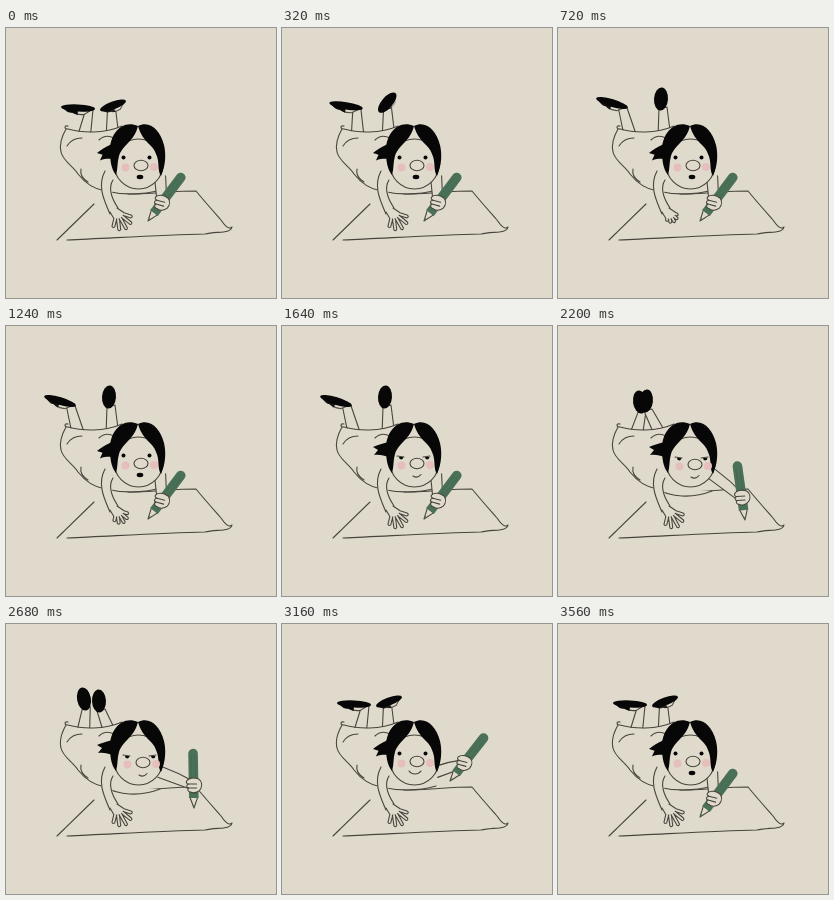
These frames come from a looping animation (270 px wide and 270 px high, 3640 ms). An HTML page:

```html
<!DOCTYPE html>
<html lang="en">
<head>
<meta charset="utf-8">
<title>Girl drawing</title>
<style>
html, body { margin: 0; width: 100%; height: 100%; overflow: hidden; background: #dfdacc; }
svg { display: block; width: 100vw; height: 100vh; }
.ln { fill: none; stroke: #48453d; stroke-width: 1.1; stroke-linecap: round; stroke-linejoin: round; }
.sk { fill: #dfdacc; }
.bk { fill: #070707; }
.blush { fill: #e6bfbd; }
</style>
</head>
<body>
<svg viewBox="0 0 270 270">
  <g id="legs"></g>

  <!-- skirt -->
  <path class="sk" d="M60 101C76 106 98 106 116 98L130 120L112 163H99C80 158 54 135 54 119Z"/>
  <path class="ln" d="M116 98C98 106 76 105 62 101C58 101 58 97 62 98M60 101C56 108 53 116 55 124C57 133 67 138 72 146C79 155 88 161 99 163"/>
  <path class="ln" d="M61 118C64 113 69 110 76 110M93 112C97 108 102 107 108 110M75 141C74 146 77 151 82 154"/>

  <!-- paper -->
  <path class="ln" d="M51 212L88 176M122 166C145 166 168 163 190 163C199 174 208 184 215 192C219 198 223 202 226 199C225 206 210 203 199 206C155 207 108 210 61 212"/>
  <path class="ln sk" id="chest"/>

  <!-- resting arm -->
  <path class="sk" d="M99 143C91 158 97 172 104 187L112 181C106 172 104 160 109 150Z"/>
  <path class="ln" d="M99 143C91 158 98 172 104 186M107 152C102 160 106 171 112 180"/>
  <path class="ln sk" id="palm"/>

  <path class="ln sk" id="arm"/>
  <path class="bk" id="tail" d="M107 116C101 117 96 119 91 121L96 124L92 129C98 128 102 130 107 131Z"/>

  <!-- head -->
  <ellipse class="ln sk" cx="132.500" cy="136" rx="24.500" ry="25"/>
  <path class="bk" d="M132 98C116 91 104 106 104 122C104 132 105 141 110 147C112 141 111 134 113 128C117 116 128 114 132 98C137 115 147 116 150 126C154 134 151 142 155 148C160 137 160 125 158 117C154 101 143 92 132 98Z"/>
  <g id="face">
    <circle class="blush" cx="119.500" cy="139.500" r="4"/>
    <circle class="blush" cx="148" cy="139" r="4"/>
    <g id="open" class="bk"><circle cx="117.500" cy="129.500" r="2"/><circle cx="143.500" cy="129.500" r="2"/></g>
    <g id="sleepy">
      <path class="bk" d="M117 131a2.200 2.400 0 0 0 4.400 0zM143 131a2.200 2.400 0 0 0 4.400 0z"/>
      <path class="ln" d="M115 130L122 131M141 131L148 130"/>
    </g>
    <ellipse class="ln sk" cx="135" cy="137.500" rx="7" ry="5.200"/>
    <ellipse class="bk" id="oh" cx="134" cy="149" rx="3.300" ry="2.200"/>
    <path class="ln" id="smirk" d="M131 150C134 152 137 151 139 148.500"/>
    <path class="ln" id="smile" d="M127 147C130 151 136 151 139 147"/>
  </g>

  <g id="pen">
    <path class="ln sk" d="M-4 -11L0 0L4 -11Z"/>
    <path d="M-1.200 -3L0 0L1.200 -3Z" fill="#4a6f57"/>
    <path d="M-4.800 -10V-54.500a4.800 4.800 0 0 1 9.600 0V-10Z" fill="#4a7158"/>
    <path d="M-2 -52V-14M2 -52V-14" stroke="#40664f" stroke-width=".6"/>
  </g>
  <g id="fist">
    <path class="ln sk" d="M5 -7C0 -9 -5 -8 -7 -5C-8 -3 -6 -2 -5 -2C-8 -1 -7 2 -5 2C-7 4 -5 6 -3 6C0 8 5 6 7 3C9 -1 8 -5 5 -7Z"/>
    <path class="ln" d="M-5 -2L3 -2M-5 2L3 2"/>
  </g>
</svg>
<script>
const LOOP = 3640;
const NS = "http://www.w3.org/2000/svg";
const $ = id => document.getElementById(id);
const set = (el, attrs) => Object.entries(attrs).forEach(([k, v]) => el.setAttribute(k, v));
const show = (id, on) => set($(id), { visibility: on ? "visible" : "hidden" });
const rad = deg => deg * Math.PI / 180;
const mix = (a, b, k) => a + (b - a) * k;
const ease = (from, to, t) => {
  const k = Math.min(1, Math.max(0, (t - from) / (to - from)));
  return k * k * (3 - 2 * k);
};

// each part is x, y, angle: sole centres and pencil tip
const rest  = { left: [72, 80, 3],  right: [107, 77.5, -20], pen: [142, 193, 37] };
const kick  = { left: [54, 75, 17], right: [103, 71, -86],   pen: rest.pen };
const cross = { left: [82, 76, 82], right: [88, 75, -84],    pen: [187, 194, -8] };
const up    = { left: [78, 75, 80], right: [93, 77, -92],    pen: [188, 184, -1] };
const reach = { left: rest.left,    right: rest.right,       pen: [168, 157, 38] };

const beats = [
  { from: 80, to: 600, pose: kick },
  { from: 1760, to: 2160, pose: cross },
  { from: 2280, to: 2640, pose: up },
  { from: 2800, to: 3120, pose: reach },
  { from: 3200, to: 3560, pose: rest }
];

const place = (part, t) => beats.reduce((v, { from, to, pose }) =>
  v.map((n, i) => mix(n, pose[part][i], ease(from, to, t))), rest[part]);

function makeLeg(part, heel, hem) {
  const add = (tag, cls, parent) => {
    const el = document.createElementNS(NS, tag);
    set(el, { class: cls });
    return parent.appendChild(el);
  };
  const leg = add("path", "ln sk", $("legs"));
  const shoe = add("g", "", $("legs"));
  const foot = add("path", "ln sk", shoe);
  const strap = add("path", "bk", shoe);
  const sole = add("ellipse", "bk", shoe);

  return t => {
    const [x, y, a] = place(part, t);
    const turn = Math.sin(rad(a)) ** 2; // 0: seen from the side, 1: sole towards us
    const rx = mix(heel > 0 ? 17 : 14, 11.5, turn), ry = mix(3.6, 7, turn);
    const ax = x + mix(heel, 2, turn), ay = y + mix(4, 10, turn);
    const hx = mix(hem, ax, .4);
    set(leg, { d: `M${hx - 6} 104L${ax - 4} ${ay}L${ax + 4} ${ay - 2}L${hx + 6} 104` });
    set(shoe, { transform: `translate(${x} ${y}) rotate(${a})` });
    set(sole, { rx, ry });
    const side = { opacity: 1 - turn };
    set(foot, { ...side, d: `M${-rx * .6} 1Q${-rx * .2} 8 ${rx * .4} 6L${rx * .8} 1` });
    set(strap, { ...side, d: `M${-rx * .85} 1Q${-rx * .6} 6 ${-rx * .3} 5L0 7V1Z` });
  };
}
const legs = [makeLeg("left", 11, 76), makeLeg("right", -2, 107)];

function drawPalm(spread) {
  let d = "M104 184";
  for (let i = 0; i < 5; i++) {
    const r = rad(104 - 21.5 * i), c = Math.cos(r), s = Math.sin(r);
    const end = (16 + 4 * Math.sin(i * Math.PI / 4)) * spread;
    const at = (along, side) => `${111 + c * along - s * side} ${184 + s * along + c * side}`;
    d += `L${at(7, 1.5)}L${at(end - 1, 1.4)}Q${at(end + 1, 0)} ${at(end - 1, -1.4)}L${at(7, -1.5)}`;
  }
  set($("palm"), { d: d + "L111 180" });
}

function drawPen([x, y, a]) {
  const hx = x + 22 * Math.sin(rad(a)), hy = y - 22 * Math.cos(rad(a));
  set($("pen"), { transform: `translate(${x} ${y}) rotate(${a})` });
  set($("fist"), { transform: `translate(${hx} ${hy}) rotate(${a * .4})` });

  const sx = 154, sy = 148, len = Math.hypot(hx - sx, hy - sy);
  const px = -(hy - sy) / len * 4, py = (hx - sx) / len * 4;
  const at = (k, w) => `${mix(sx, hx, k) + px * w} ${mix(sy, hy, k) + py * w}`;
  set($("arm"), { d: `M${at(0, 1.4)}L${at(1, 1)}L${at(1, -1)}Q${at(.5, -1.6)} ${at(0, -1.4)}` });
}

function draw(t) {
  legs.forEach(drawLeg => drawLeg(t));
  drawPen(place("pen", t));
  drawPalm(1 - .4 * ease(320, 680, t) + .4 * ease(1000, 1560, t));

  const lean = ease(1760, 2160, t) - ease(2800, 3120, t);
  const sag = 166 + 5 * lean;
  set($("chest"), { d: `M99 163C112 ${sag} 134 ${sag + 2} 154 ${162 + 3 * lean}` });
  set($("face"), { transform: `translate(${2 * lean} ${lean})` });

  const sleepy = t >= 1320 && t < 2920;
  const smiling = t >= 2920 && t < 3400;
  show("sleepy", sleepy);
  show("open", !sleepy);
  show("smirk", sleepy);
  show("smile", smiling);
  show("oh", !sleepy && !smiling);
  set($("tail"), { transform: `rotate(${sleepy ? 0 : -14} 107 123)` });
}

// the picture advances in 80 ms steps, with three short ones after 720 ms
function step(t) {
  if (t < 720) return t - t % 80;
  if (t < 840) return t - t % 40;
  return t - (t - 840) % 80;
}

const begin = performance.now();
function tick(now) {
  draw(step(Math.max(0, now - begin) % LOOP));
  requestAnimationFrame(tick);
}
draw(0);
requestAnimationFrame(tick);
</script>
</body>
</html>
```
